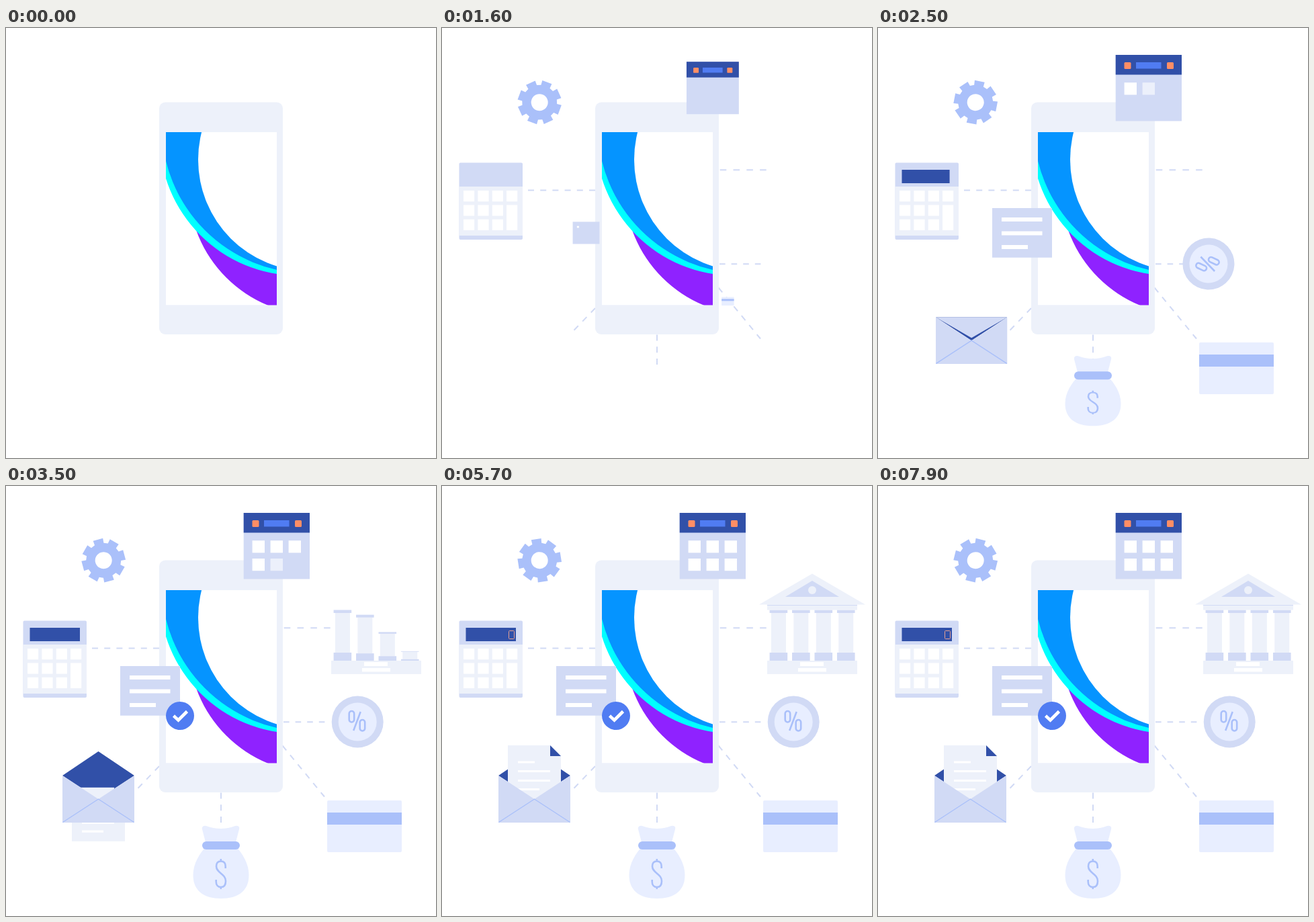
An HTML page for the animation above (8000 ms loop, 640 by 640 pixels).

```html
<!DOCTYPE html>
<html lang="en">
<head>
<meta charset="utf-8">
<title>Mobile banking</title>
<style>
  html, body { margin: 0; width: 100%; height: 100%; overflow: hidden; background: #fff; }
  svg { display: block; width: 100vw; height: 100vh; }
  .ice { fill: #edf1fa; }
  .mist { fill: #d1daf5; }
  .pale { fill: #e8eeff; }
  .sky { fill: #aac0fa; }
  .navy { fill: #3150a8; }
  .blue { fill: #507cf2; }
  .white { fill: #fff; }
  .orange { fill: #ff8e65; }
  .glyph { fill: none; stroke: #aac0fa; stroke-width: 2.6; }
</style>
</head>
<body>
<svg viewBox="0 0 640 640">
  <defs>
    <clipPath id="screen"><rect x="238" y="155" width="165" height="257.5"/></clipPath>
    <clipPath id="cardEdge"><rect x="478" y="468" width="111" height="77" rx="2"/></clipPath>
  </defs>

  <g id="dashes" stroke="#d1daf5" stroke-width="2"></g>

  <g id="gear">
    <path id="cog" class="sky"/>
    <circle r="12.5" class="white"/>
  </g>

  <g id="calc">
    <rect x="25.5" y="200.5" width="94.5" height="114.5" rx="2" class="mist"/>
    <rect x="25.5" y="236" width="94.5" height="73" class="ice"/>
    <g id="keys" class="white"></g>
    <rect id="display" x="35.5" y="211" height="20" class="navy"/>
    <rect id="digit" x="99.5" y="215.5" width="8" height="12" rx="1" fill="none" stroke="#e5a093"/>
  </g>

  <g id="mail">
    <path class="navy" d="M84 431H191L137.5 466Z"/>
    <path id="flap"/>
    <g id="letter">
      <path class="ice" d="M98 386H161L177 402V466H98Z"/>
      <path class="navy" d="M161 386L177 402H161Z"/>
      <path stroke="#fff" stroke-width="3.2" d="M113 411H138M113 424.5H161M113 438.5H161M113 451.5H145"/>
    </g>
    <path class="mist" d="M84 431L137.5 466L191 431V501H84Z"/>
    <path fill="none" stroke="#aac0fa" stroke-width="1.4" d="M84.5 500.5L137.5 466L190.5 500.5"/>
  </g>

  <g id="card" clip-path="url(#cardEdge)">
    <rect x="478" y="468" width="111" height="77" class="pale"/>
    <rect x="478" y="486" width="111" height="18" class="sky"/>
    <path id="sheen" fill="#fff" opacity=".4" d="M0 468H26L-14 545H-40Z"/>
  </g>

  <g id="sack">
    <path class="pale" d="M297 530L292 511C291 507 294 505 298 506Q320 514 341 506C346 505 348 507 347 511L342 530Z"/>
    <path id="belly" class="pale" d="M299 535C288 547 278.500 562 278.500 579C278.500 603 295 614 320 614C345 614 361.500 603 361.500 579C361.500 562 352 547 341 535Z"/>
    <rect x="292" y="529" width="56" height="12" rx="6" class="sky"/>
    <path id="dollar" class="glyph" d="M326.700 569V566C326.700 561 324 558.500 319.800 558.500S313 561 313 566C313 576 327 577 327 588C327 594 324 597 319.800 597S312.700 594 312.700 589V586M319.800 555V559M319.800 596V600"/>
  </g>

  <g id="coin">
    <circle r="38.500" class="mist"/>
    <circle r="28.500" class="pale"/>
    <g class="glyph">
      <rect x="-12.500" y="-16" width="7.500" height="16.500" rx="3.700"/>
      <rect x="3.500" y="-3" width="7.500" height="16.500" rx="3.700"/>
      <path d="M4.500 -15L-6 13"/>
    </g>
  </g>

  <g id="bank">
    <g id="base">
      <rect x="484" y="260" width="134" height="20" class="ice"/>
      <path class="white" d="M533 262H568V268H533ZM530 271H572V276.500H530Z"/>
    </g>
    <g id="columns"></g>
    <g id="beam">
      <rect x="484" y="177" width="134" height="7.500" class="ice"/>
      <rect x="484" y="176.700" width="134" height="1.300" class="mist"/>
    </g>
    <path id="roof" class="ice" d="M472 176.500L551 130.500L630 176.500Z"/>
    <path id="pediment" class="mist" d="M511 165L551 141L591 165Z"/>
    <circle id="oculus" cx="551" cy="155" r="6" class="ice"/>
  </g>

  <g id="phone">
    <rect x="228" y="110.500" width="184" height="345.500" rx="9" class="ice"/>
    <g clip-path="url(#screen)">
      <rect x="238" y="155" width="165" height="257.500" class="white"/>
      <circle cx="462" cy="237" r="190" fill="#8f22ff"/>
      <circle cx="434.600" cy="162.400" r="206" fill="#0ff"/>
      <circle cx="451.400" cy="145.700" r="219.700" fill="#0594ff"/>
      <circle cx="452" cy="196" r="166" class="white"/>
    </g>
  </g>

  <g id="calendar">
    <rect x="353.700" y="40" width="98.300" height="98.500" class="mist"/>
    <rect x="353.700" y="40" width="98.300" height="29.500" class="navy"/>
    <rect x="366.500" y="51" width="10" height="10" rx="1.500" class="orange"/>
    <rect x="384" y="51" width="37.500" height="9.500" class="blue"/>
    <rect x="430" y="51" width="10" height="10" rx="1.500" class="orange"/>
    <g id="days" class="white"></g>
  </g>

  <g id="note">
    <rect x="170" y="268" width="89" height="73.700" class="mist"/>
    <g id="lines" class="white"></g>
  </g>
  <g id="badge">
    <circle cx="259" cy="342" r="21" class="blue"/>
    <path id="tick" fill="none" stroke="#fff" stroke-width="4.600" pathLength="1" d="M249.500 342L256.500 348.500L269.500 335.500"/>
  </g>
</svg>

<script>
const LOOP = 8000, STEP = 100;
const $ = id => document.getElementById(id);
const clamp = x => Math.min(1, Math.max(0, x));
const mix = (a, b, p) => a + (b - a) * p;

function add(parent, tag, attrs) {
  const el = document.createElementNS('http://www.w3.org/2000/svg', tag);
  for (const key in attrs) el.setAttribute(key, attrs[key]);
  return $(parent).appendChild(el);
}
const set = (id, key, value) => $(id).setAttribute(key, value);

function scaleAt(el, cx, cy, sx, sy = sx, dx = 0, dy = 0) {
  el.setAttribute('transform',
    `translate(${cx + dx} ${cy + dy}) scale(${sx} ${sy}) translate(${-cx} ${-cy})`);
  el.style.display = sx === 0 || sy === 0 ? 'none' : '';
}

// Connector lines grow outwards from the phone: x1, y1, x2, y2, dash, gap
const connectors = [
  [228, 241.5, 127.5, 241.5, 9, 9.2],
  [413.7, 211.3, 483, 211.3, 9.6, 10.2],
  [413, 351.3, 474.5, 351.3, 8.6, 9],
  [411.5, 386.5, 474, 462.5, 9, 9],
  [320, 456.5, 320, 501.5, 9, 8.7],
  [228, 417, 196.3, 450, 9, 9.2]
].map(([x1, y1, x2, y2, dash, gap]) => ({
  x1, y1, x2, y2,
  el: add('dashes', 'line', { x1, y1, 'stroke-dasharray': `${dash} ${gap}` })
}));

const cogPoints = [];
for (let i = 0; i < 8; i++) {
  for (const [r, offset] of [[26, -15.5], [32.9, -13.2], [32.9, 13.2], [26, 15.5]]) {
    const a = (i * 45 + offset) * Math.PI / 180;
    cogPoints.push(`${r * Math.cos(a)} ${r * Math.sin(a)}`);
  }
}
set('cog', 'd', `M${cogPoints.join('L')}Z`);

for (let row = 0; row < 3; row++) {
  for (let col = 0; col < 4; col++) {
    if (col === 3 && row === 2) continue;
    add('keys', 'rect', {
      x: 32 + col * 21.35, y: 242 + row * 21.4, width: 16.2,
      height: col === 3 && row === 1 ? 37.6 : 16.2
    });
  }
}

const days = Array.from({ length: 6 }, (_, i) => add('days', 'rect', {
  x: 366.6 + i % 3 * 27, y: 81.2 + Math.floor(i / 3) * 26.8, width: 18.4, height: 18.2
}));

const lines = [60.5, 60.5, 39].map((width, i) => ({
  width, el: add('lines', 'rect', { x: 184, y: 282 + i * 20.5, height: 6 })
}));

const columns = [0, 1, 2, 3].map(i => {
  const x = 487.6 + i * 33.45;
  const g = add('columns', 'g', {});
  for (const [dx, y, width, height, fill] of [
    [2.3, 189, 22, 59, 'ice'], [0, 184.5, 26.6, 4.5, 'mist'], [0, 248, 26.6, 12, 'mist']
  ]) {
    g.appendChild(add('columns', 'rect', { x: x + dx, y, width, height, class: fill }));
  }
  return g;
});

// Time in ms and direction of one tooth in degrees
const turns = [[0, -165], [2000, -102], [2500, -79], [3500, -15], [5700, 126], [7900, 239], [8000, 244]];
function cogAngle(t) {
  const i = turns.findIndex(key => key[0] > t);
  const [t0, a0] = turns[i - 1], [t1, a1] = turns[i];
  return mix(a0, a1, (t - t0) / (t1 - t0));
}

function draw(t) {
  const linear = (start, length) => clamp((t - start) / length);
  const ease = (start, length) => {
    const x = linear(start, length);
    return x * x * (3 - 2 * x);
  };

  const grow = ease(0, 1070);
  for (const c of connectors) {
    c.el.setAttribute('x2', mix(c.x1, c.x2, grow));
    c.el.setAttribute('y2', mix(c.y1, c.y2, grow));
  }
  $('dashes').style.display = grow ? '' : 'none';

  set('gear', 'transform', `translate(145.200 110.700) rotate(${cogAngle(t)}) scale(${ease(840, 720)})`);

  let p = ease(770, 690);
  scaleAt($('calc'), 72.7, 257.7, mix(.43, 1, p), undefined, 247 * (1 - p), -24 * (1 - p));
  set('display', 'width', 74.5 * ease(1780, 827));
  set('digit', 'opacity', linear(3900, 300));

  p = ease(1615, 940);
  scaleAt($('mail'), 137.5, 466, mix(.3, 1, p), undefined, 168 * (1 - p), -83 * (1 - p));
  const fold = mix(1, -1.03, ease(2400, 700));
  set('flap', 'd', `M84 431H191L137.500 ${431 + 35 * fold}Z`);
  set('flap', 'class', fold > 0 ? 'mist' : 'navy');
  set('letter', 'transform', `translate(0 ${80 * (1 - ease(3230, 900))})`);
  $('letter').style.display = t < 3100 ? 'none' : '';

  p = ease(1437, 625);
  scaleAt($('card'), 533.5, 506.5, p, undefined, -130 * (1 - p), -120 * (1 - p));
  set('sheen', 'transform', `translate(${mix(478, 631, ease(5800, 1100))} 0)`);
  $('sheen').style.display = t > 5800 && t < 6900 ? '' : 'none';

  const drop = ease(1610, 410), settle = ease(2450, 650), fill = ease(2000, 1000);
  set('sack', 'transform', `translate(0 ${mix(-170, -18, drop) + 18 * settle})`);
  scaleAt($('belly'), 320, 535, 1, mix(.9, 1, fill));
  scaleAt($('dollar'), 320, 578, 1, mix(.78, 1, settle), 0, -2.5 * (1 - settle));

  p = ease(1689, 1111);
  set('coin', 'transform', `translate(${mix(349, 523.2, p)} 351) rotate(${-360 * (1 - p)})`);

  scaleAt($('base'), 551, 270, ease(2500, 250), 1);
  columns.forEach((g, i) => scaleAt(g, 551, 260, 1, ease(2854 + i * 160, 600)));
  scaleAt($('beam'), 551, 184, ease(3850, 300), 1);
  scaleAt($('roof'), 551, 176.5, ease(4050, 450));
  scaleAt($('pediment'), 551, 165, ease(4500, 500));
  scaleAt($('oculus'), 551, 155, ease(4900, 450));

  scaleAt($('calendar'), 403, 89.2, ease(950, 920));
  days.forEach((day, i) => day.setAttribute('opacity', linear(1930 + i * 333, 400)));

  scaleAt($('note'), 214.5, 305, ease(1200, 860));
  lines.forEach((line, i) => line.el.setAttribute('width', line.width * ease(1500 + i * 230, 480)));
  scaleAt($('badge'), 259, 342, ease(2700, 500));
  set('tick', 'stroke-dasharray', `${ease(2950, 450)} 2`);
  $('tick').style.display = t > 2950 ? '' : 'none';
}

const begin = performance.now();
function frame() {
  const t = (performance.now() - begin) % LOOP;
  draw(Math.floor(t / STEP) * STEP);
  requestAnimationFrame(frame);
}
frame();
</script>
</body>
</html>
```
